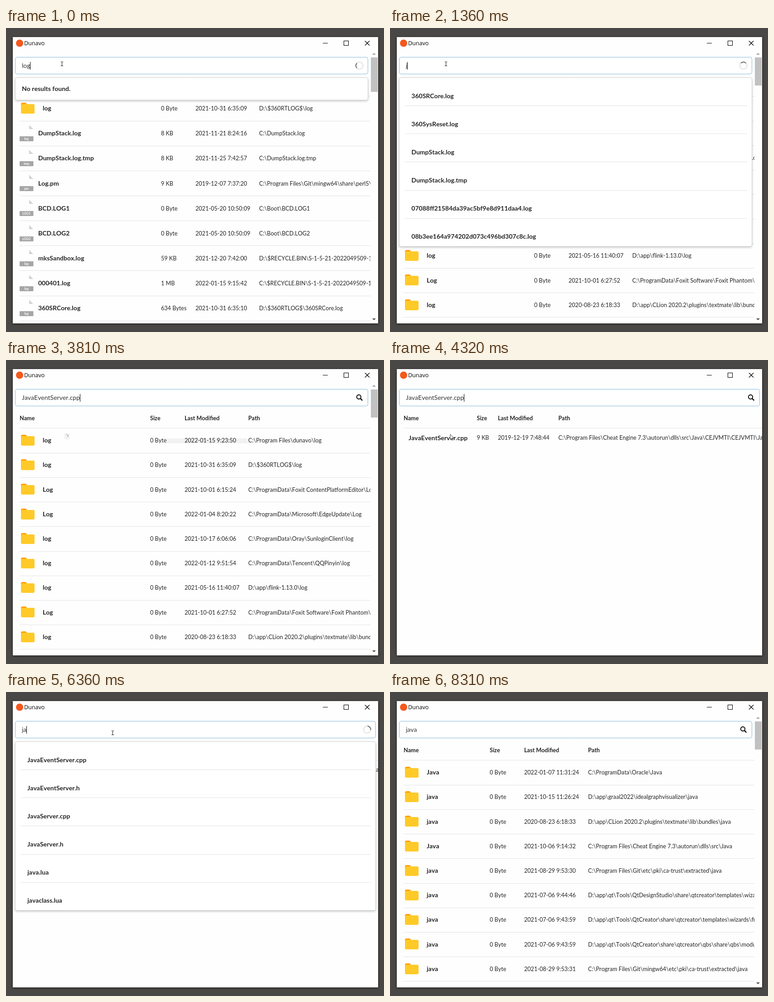
Write an HTML page with a canvas that moves like this. It is 834 px wide and 671 px high and loops after 8.46 s.

```html
<!DOCTYPE html>
<html lang="en">
<head>
<meta charset="utf-8">
<title>File search</title>
<style>
html, body { margin: 0; width: 100%; height: 100%; overflow: hidden; background: #4a4846; }
canvas { display: block; }
</style>
</head>
<body>
<canvas id="stage" width="834" height="671"></canvas>
<script>
const c = document.getElementById('stage').getContext('2d');
c.fontKerning = 'none';
const LOOP = 8460;
const INK = '#242424', LINE = '#e3e3e4';
const LATO = 'Lato, "Open Sans", sans-serif';

// The screen only refreshes at these moments.
const ticks = [0, 120, 240, 360, 790, 910, 1060, 1210, 1350, 1490, 1640, 1780,
  1930, 2080, 2230, 2350, 2630, 2910, 3180, 3310, 3440, 3560, 3690, 3810, 3930, 4070, 4200,
  4320, 4450, 4590, 4720, 4850, 4990, 5120, 5250, 5400, 5680, 5960, 6360, 6510, 6650, 6790,
  6910, 7190, 7480, 7620, 7760, 7900, 8040, 8170, 8310];

// Each entry changes some of the state from its time on.
const script = [
  [0, { text: 'log', caret: true, busy: true, drop: 'none', table: 'mixed' }],
  [120, { drop: 'log' }],
  [240, { table: 'log' }],
  [360, { busy: false }],
  [790, { text: 'lo', caret: false, busy: true }],
  [910, { text: 'l', caret: true }],
  [1060, { text: '', busy: false, drop: '' }],
  [1350, { text: 'j', busy: true, drop: 'log' }],
  [1490, { text: 'ja' }],
  [1640, { text: 'jav' }],
  [1780, { text: 'java' }],
  [2080, { drop: 'java' }],
  [2230, { busy: false }],
  [2910, { caret: false }],
  [3180, { caret: true }],
  [3560, { text: 'JavaEventServer.cpp', drop: '' }],
  [3690, { hover: true }],
  [3930, { hover: false, table: 'single' }],
  [4450, { caret: false }],
  [4850, { caret: true }],
  [5120, { caret: false }],
  [5680, { caret: true, drop: 'java' }],
  [5960, { caret: false, selected: true }],
  [6360, { text: 'ja', caret: true, selected: false, busy: true }],
  [6510, { text: 'jav' }],
  [6650, { text: 'java' }],
  [6790, { table: 'java' }],
  [6910, { busy: false, drop: '' }],
  [7190, { caret: false }],
  [7480, { caret: true }],
  [8040, { caret: false }]
];

const mousePath = [[0, 123, 79], [2600, 123, 79], [2630, 127, 86], [2910, 128, 87],
  [3440, 132, 152], [3810, 133, 164], [4320, 133, 164], [5250, 268, 80], [5400, 235, 90],
  [7420, 235, 90], [8170, 766, 634]];

const menus = {
  log: ['360SRCore.log', '360SysReset.log', 'DumpStack.log', 'DumpStack.log.tmp',
    '07088ff21584da39ac5bf9e8d911daa4.log', '08b3ee164a974202d073c496bd307c8c.log'],
  java: ['JavaEventServer.cpp', 'JavaEventServer.h', 'JavaServer.cpp', 'JavaServer.h',
    'java.lua', 'javaclass.lua']
};

// Rows: name | size | modified | path | badge of a file icon
const rows = s => s.trim().split('\n').map(r => r.trim().split('|'));
const tables = {
  mixed: { cols: [342, 418, 558.5], pitch: 55.13, thumb: 76, rows: rows(String.raw`
    log|0 Byte|2021-10-31 6:35:09|D:\$360RTLOG$\log
    DumpStack.log|8 KB|2021-11-21 8:24:16|C:\DumpStack.log|log
    DumpStack.log.tmp|8 KB|2021-11-25 7:42:57|C:\DumpStack.log.tmp|tmp
    Log.pm|9 KB|2019-12-07 7:37:20|C:\Program Files\Git\mingw64\share\perl5\Git|pm
    BCD.LOG1|0 Byte|2021-05-20 10:50:09|C:\Boot\BCD.LOG1|LOG1
    BCD.LOG2|0 Byte|2021-05-20 10:50:09|C:\Boot\BCD.LOG2|LOG2
    mksSandbox.log|59 KB|2021-12-20 7:42:00|D:\$RECYCLE.BIN\S-1-5-21-2022049509-17|log
    000401.log|1 MB|2022-01-15 9:15:42|C:\$RECYCLE.BIN\S-1-5-21-2022049509-17|log
    360SRCore.log|634 Bytes|2021-10-31 6:35:10|D:\$360RTLOG$\360SRCore.log|log`) },
  log: { cols: [318, 394, 534.5], pitch: 54.2, thumb: 62, rows: rows(String.raw`
    log|0 Byte|2022-01-15 9:23:50|C:\Program Files\dunavo\log
    log|0 Byte|2021-10-31 6:35:09|D:\$360RTLOG$\log
    Log|0 Byte|2021-10-01 6:15:24|C:\ProgramData\Foxit ContentPlatformEditor\Log
    Log|0 Byte|2022-01-04 8:20:22|C:\ProgramData\Microsoft\EdgeUpdate\Log
    log|0 Byte|2021-10-17 6:06:06|C:\ProgramData\Oray\SunloginClient\log
    log|0 Byte|2022-01-12 9:51:54|C:\ProgramData\Tencent\QQPinyin\log
    log|0 Byte|2021-05-16 11:40:07|D:\app\flink-1.13.0\log
    Log|0 Byte|2021-10-01 6:27:52|C:\ProgramData\Foxit Software\Foxit Phantom\Log
    log|0 Byte|2020-08-23 6:18:33|D:\app\CLion 2020.2\plugins\textmate\lib\bundles\log`) },
  java: { cols: [220, 296, 437], pitch: 54.2, thumb: 62, rows: rows(String.raw`
    Java|0 Byte|2022-01-07 11:31:24|C:\ProgramData\Oracle\Java
    java|0 Byte|2021-10-15 11:26:24|D:\app\graal2022\idealgraphvisualizer\java
    java|0 Byte|2020-08-23 6:18:33|D:\app\CLion 2020.2\plugins\textmate\lib\bundles\java
    Java|0 Byte|2021-10-06 9:14:32|C:\Program Files\Cheat Engine 7.3\autorun\dlls\src\Java
    java|0 Byte|2021-08-29 9:53:30|C:\Program Files\Git\etc\pki\ca-trust\extracted\java
    java|0 Byte|2021-07-06 9:44:46|D:\app\qt\Tools\QtDesignStudio\share\qtcreator\templates\wizards
    java|0 Byte|2021-07-06 9:43:59|D:\app\qt\Tools\QtCreator\share\qtcreator\templates\wizards\files
    java|0 Byte|2021-07-06 9:43:59|D:\app\qt\Tools\QtCreator\share\qtcreator\qbs\share\qbs\modules
    java|0 Byte|2021-08-29 9:53:31|C:\Program Files\Git\mingw64\etc\pki\ca-trust\extracted\java`) },
  single: { cols: [191.5, 238, 371.5], wide: true, rows: rows(String.raw`
    JavaEventServer.cpp|9 KB|2019-12-19 7:48:44|C:\Program Files\Cheat Engine 7.3\autorun\dlls\src\Java\CEJVMTI\CEJVMTI\JavaEventServer.cpp`) }
};

function write(s, x, y, size = 12.6, weight = 400, color = INK, family = LATO) {
  c.font = `${weight} ${size}px ${family}`;
  c.fillStyle = color;
  c.fillText(s, x, Math.round(y));
}

function box(x, y, w, h, color) {
  c.fillStyle = color;
  c.fillRect(x, y, w, h);
}

function round(x, y, w, h, r, fill, stroke) {
  c.beginPath();
  c.roundRect(x, y, w, h, r);
  if (fill) { c.fillStyle = fill; c.fill(); }
  if (stroke) { c.strokeStyle = stroke; c.lineWidth = 1; c.stroke(); }
}

function poly(points, fill, stroke, width = 1) {
  c.beginPath();
  points.forEach(p => c.lineTo(p[0], p[1]));
  if (fill) { c.closePath(); c.fillStyle = fill; c.fill(); }
  if (stroke) { c.strokeStyle = stroke; c.lineWidth = width; c.stroke(); }
}

function ring(x, y, r, from, to, color, width) {
  c.beginPath();
  c.arc(x, y, r, from, to);
  c.strokeStyle = color;
  c.lineWidth = width;
  c.stroke();
}

function shadow(color, blur, dy) {
  c.shadowColor = color;
  c.shadowBlur = blur;
  c.shadowOffsetY = dy;
}

function drawWindow() {
  box(0, 0, 834, 671, '#4a4846');
  c.save();
  shadow('rgba(0,0,0,.65)', 5, 1);
  box(15, 20, 806, 632, '#fefefe');
  c.restore();
  c.beginPath();
  c.arc(30, 33.5, 8, 0, 7);
  c.fillStyle = '#f4581c';
  c.fill();
  write('Dunavo', 40, 38, 12.5, 400, '#000', '"Open Sans", "Noto Sans", sans-serif');
  box(699, 33, 11, 1, '#000');
  c.strokeStyle = '#000';
  c.lineWidth = 1.1;
  c.strokeRect(745.5, 28.5, 10, 10);
  poly([[792, 28.5], [802, 38.5]], null, '#000', 1.2);
  poly([[802, 28.5], [792, 38.5]], null, '#000', 1.2);
}

function drawScrollbar(thumb) {
  poly([[808, 59], [812, 55], [816, 59]], '#a3a3a3');
  poly([[808, 641], [816, 641], [812, 645]], '#505050');
  box(805, 65, 15, thumb, '#c1c1c1');
}

function drawFolder(y) {
  poly([[35, y - 12], [43.5, y - 12], [46.5, y - 9], [60, y - 9], [60, y - 5], [33, y - 5],
    [33, y - 10]], '#ffa000');
  round(33, y - 9, 30, 21, 3, '#ffca28');
}

function drawFile(y, badge) {
  poly([[51, y - 18], [60, y - 9], [51, y - 9]], '#d3d3d3');
  round(30, y + 7, 30.5, 11, 1, '#a6a6a6');
  c.textAlign = 'center';
  write(badge, 45.2, y + 15, 7, 700, '#fff');
  c.textAlign = 'left';
}

function drawTable(t, hover) {
  const right = t.wide ? 821 : 804;
  c.save();
  c.beginPath();
  c.rect(15, 104, right - 15, 548);
  c.clip();
  ['Name', 'Size', 'Last Modified', 'Path'].forEach((h, i) =>
    write(h, i ? t.cols[i - 1] : 30, 133, 12.6, 700));
  box(30, 150, right - 30, 1, LINE);
  if (hover) {
    box(354, 173, 180, 11, '#f2f2f2');
    box(129, 162, 11, 13, '#f1f1f1');
  }
  t.rows.forEach(([name, size, date, path, badge], i) => {
    const y = t.wide ? 171 : 177.4 + i * t.pitch;
    if (t.wide) write(name, 41, 177, 14, 700);
    else {
      if (badge) drawFile(Math.floor(y), badge); else drawFolder(Math.floor(y));
      write(name, badge ? 71 : 81, y + 4.8, 14, 700);
      box(30, Math.round(204.7 + i * t.pitch), right - 30, 1, LINE);
    }
    [size, date, path].forEach((s, k) => write(s, t.cols[k], y + 4.8));
  });
  c.restore();
  if (!t.wide) drawScrollbar(t.thumb);
}

function drawInput(s, right, t) {
  round(20.5, 64.5, right - 20, 37, 4, '#fff', '#85b7d9');
  c.font = `14px ${LATO}`;
  const w = c.measureText(s.text).width;
  if (s.selected) box(35, 75, w, 17, '#c1c1c1');
  write(s.text, 35, 88, 14, 400, '#333');
  if (s.caret) box(Math.round(35 + w - 0.5), 75, 1, 17, '#000');

  const x = right - 18.2, y = 83;
  if (s.busy) {
    const mid = Math.PI * (180 + t * 0.6 - (t > 6000 ? 75 : 0)) / 180;
    ring(x, y, 7.9, 0, 7, '#e4e4e4', 2.2);
    ring(x, y, 7.9, mid - Math.PI / 4, mid + Math.PI / 4, '#767676', 2.2);
  } else {
    ring(x - 1.3, y - 1.5, 4.6, 0, 7, '#1c1c1c', 2.1);
    c.lineCap = 'round';
    poly([[x + 2.4, y + 2.2], [x + 5.8, y + 5.6]], null, '#1c1c1c', 2.7);
    c.lineCap = 'butt';
  }
}

function drawMenu(kind, right) {
  const empty = kind === 'none';
  const height = empty ? 49.5 : 372.5;
  c.save();
  shadow('rgba(34,36,38,.3)', 5, 2);
  round(20.5, 109.5, right - 20, height, 4, '#fff');
  c.restore();
  round(20.5, 109.5, right - 20, height, 4, '#fff', '#d4d4d5');
  if (empty) {
    write('No results found.', 35, 139, 14, 700);
    return;
  }
  menus[kind].forEach((name, i) => {
    write(name, 47.3, 154.9 + i * 62.1, 14, 700);
    if (i < 5) box(32, Math.round(171.2 + i * 62.1), right - 42, 1, LINE);
  });
}

function mouseAt(t) {
  const n = mousePath.findIndex(p => p[0] > t);
  if (n < 0) return mousePath[mousePath.length - 1].slice(1);
  const [a, b] = [mousePath[n - 1], mousePath[n]];
  const u = (t - a[0]) / (b[0] - a[0]), e = u * u * (3 - 2 * u);
  return [a[1] + (b[1] - a[1]) * e, a[2] + (b[2] - a[2]) * e];
}

function drawMouse(t, faint) {
  if (t >= 8310) return;
  const [x, y] = mouseAt(t).map(Math.round);
  if (faint) {
    poly([[x, y - 1], [x + 5, y + 4], [x + 2, y + 4]], null, '#777', 0.8);
  } else if (y > 64 && y < 102) {
    box(x, y - 4, 1, 9, '#111');
    for (const dy of [-5, 4]) {
      box(x - 2, y + dy, 2, 1, '#111');
      box(x + 1, y + dy, 2, 1, '#111');
    }
  } else {
    const tip = [[0, 0], [0, 11], [2.6, 8.7], [4.4, 12.5], [6, 11.8], [4.3, 8], [7.8, 8], [0, 0]];
    poly(tip.map(p => [x + p[0], y + p[1]]), '#fff', '#111', 0.8);
  }
}

function draw(now) {
  const time = now % LOOP;
  const t = ticks.filter(v => v <= time).pop();
  const s = Object.assign({}, ...script.filter(e => e[0] <= t).map(e => e[1]));
  const table = tables[s.table];
  const right = table.wide ? 815 : 798;
  drawWindow();
  drawTable(table, s.hover);
  drawInput(s, right, t);
  if (s.drop) drawMenu(s.drop, right);
  drawMouse(t, s.hover);
}

const start = performance.now();
function loop() {
  draw(performance.now() - start);
  requestAnimationFrame(loop);
}
loop();
</script>
</body>
</html>
```
